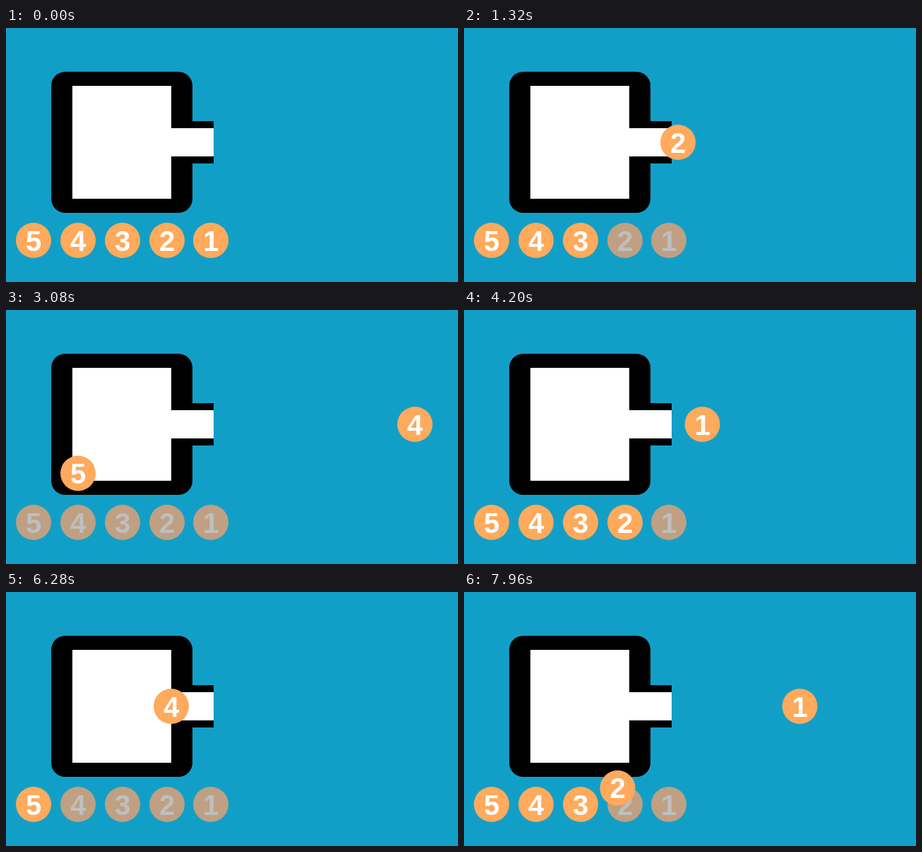
An HTML page with a canvas that plays this animation: 640x360 px, repeating every 8000 ms.

```html
<!DOCTYPE html>
<html lang="en">
<head>
<meta charset="utf-8">
<title>Numbered balls passing through a box</title>
<style>
  html, body { margin: 0; width: 100%; height: 100%; overflow: hidden; background: #129fc7; }
  canvas { display: block; }
</style>
</head>
<body>
<canvas id="stage" width="640" height="360"></canvas>
<script>
const ctx = document.getElementById('stage').getContext('2d');

const STEP_MS = 40, LOOP_STEPS = 200;
const CYCLE = 90, GAP = 18, LEG = 12;
const HOME_X = [290, 228, 165, 102, 39], HOME_Y = 301;
const TURN = { x: 165, y: 162 }, EXIT_X = 579;
const BRIGHT = { disc: '#ffaa5c', digit: '#fff' };
const FADED = { disc: '#bfa083', digit: '#bfbfbf' };

const startStep = (cycle, ball) => Math.max(0, cycle * CYCLE + ball * GAP - 1);
const mix = (a, b, p) => a + (b - a) * p;

function rect(color, x, y, w, h) {
  ctx.fillStyle = color;
  ctx.fillRect(x, y, w, h);
}

function drawBox() {
  ctx.fillStyle = '#000';
  ctx.beginPath();
  ctx.roundRect(64, 62, 200, 200, 20);
  ctx.fill();
  rect('#000', 260, 132, 34, 60);
  rect('#fff', 94, 82, 140, 160);
  rect('#fff', 234, 142, 60, 40);
}

function drawBall(ball, x, y, look) {
  ctx.fillStyle = look.disc;
  ctx.beginPath();
  ctx.arc(x, y, 25, 0, Math.PI * 2);
  ctx.fill();
  ctx.fillStyle = look.digit;
  ctx.fillText(ball + 1, x, y + 14.5);
}

// Home to the middle of the box, then straight out to the right.
function drawFlight(ball, age) {
  const firstLeg = ball === 0 ? LEG - 1 : LEG;
  if (age < 0 || age > firstLeg + LEG) return;
  if (age < firstLeg) {
    const p = age / firstLeg;
    drawBall(ball, mix(HOME_X[ball], TURN.x, p), mix(HOME_Y, TURN.y, p), BRIGHT);
  } else {
    drawBall(ball, mix(TURN.x, EXIT_X, (age - firstLeg) / LEG), TURN.y, BRIGHT);
  }
}

function draw(step) {
  rect('#129fc7', 0, 0, 640, 360);
  drawBox();
  ctx.font = 'bold 40px "Liberation Sans", Arial, sans-serif';
  ctx.textAlign = 'center';

  // A new cycle restores every ball in the row.
  const cycle = Math.floor((step + 1) / CYCLE);
  HOME_X.forEach((x, ball) =>
    drawBall(ball, x, HOME_Y, step >= startStep(cycle, ball) ? FADED : BRIGHT));

  for (let c = 0; c <= cycle; c++)
    HOME_X.forEach((_, ball) => drawFlight(ball, step - startStep(c, ball)));
}

const origin = performance.now();
function tick() {
  const elapsed = performance.now() - origin;
  draw(Math.floor(elapsed / STEP_MS + 0.01) % LOOP_STEPS);
  requestAnimationFrame(tick);
}
tick();
</script>
</body>
</html>
```
